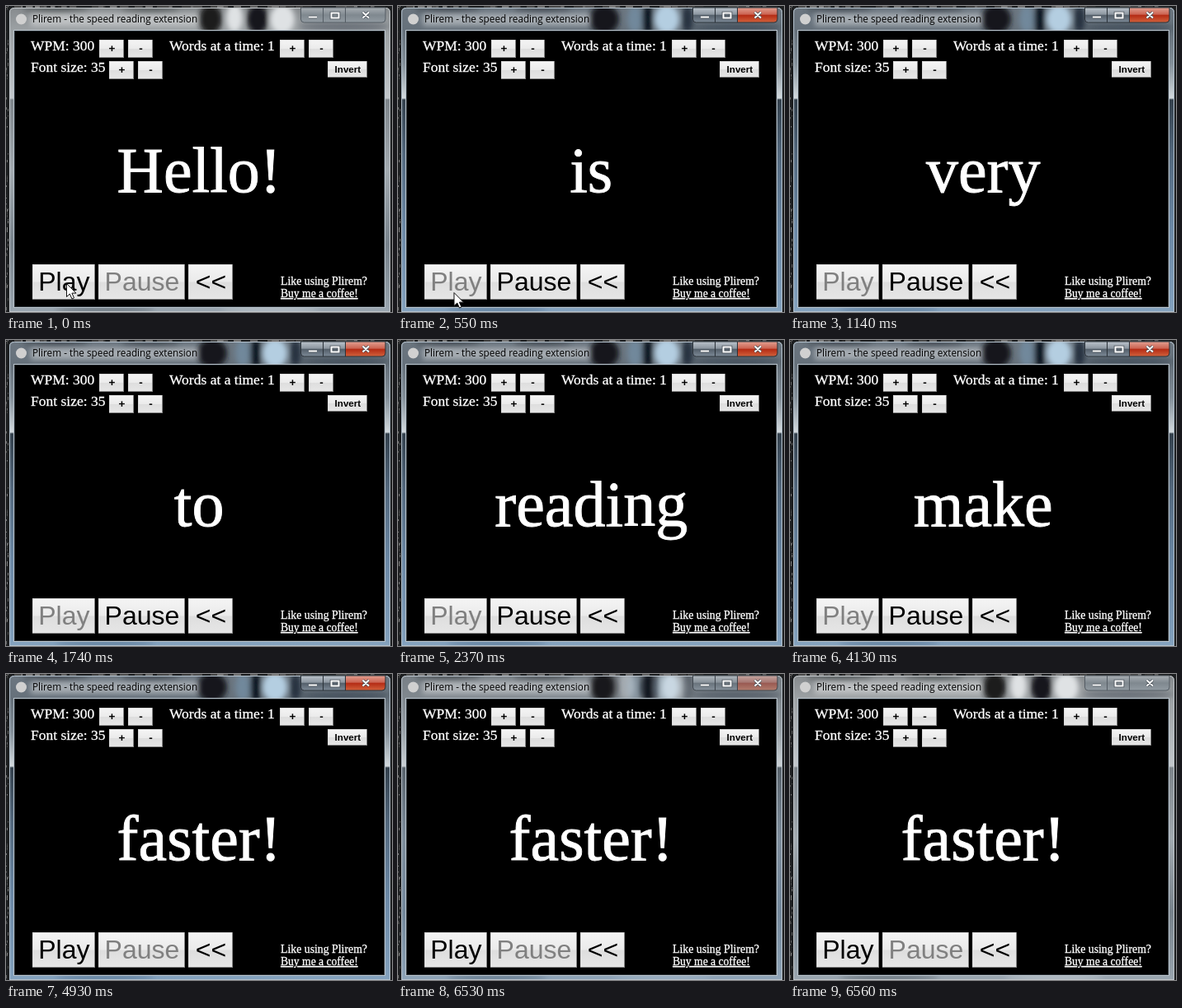
An HTML page that plays this animation: 468x372 px, repeating every 6720 ms.

```html
<!DOCTYPE html>
<html lang="en">
<head>
<meta charset="utf-8">
<title>Speed reader</title>
<style>
html, body { margin: 0; width: 100%; height: 100%; overflow: hidden; background: #000; }
svg { display: block; width: 468px; height: 372px; }
.serif { font-family: "Liberation Serif", serif; fill: #fff; stroke: #fff; stroke-width: .3px; }
#word { stroke-width: .9px; }
.sans { font-family: "Liberation Sans", sans-serif; }
.title { font-family: "Open Sans", sans-serif; font-size: 11.75px; fill: #000; }
</style>
</head>
<body>
<svg id="stage" viewBox="0 0 468 372" xmlns="http://www.w3.org/2000/svg">
  <defs>
    <linearGradient id="face" x2="0" y2="1">
      <stop offset="0" stop-color="#f4f4f4"/><stop offset=".48" stop-color="#ebebeb"/>
      <stop offset=".52" stop-color="#dedede"/><stop offset="1" stop-color="#e6e6e6"/>
    </linearGradient>
    <linearGradient id="red" x2="0" y2="1">
      <stop offset="0" stop-color="#e3a092"/><stop offset=".46" stop-color="#cb6250"/>
      <stop offset=".5" stop-color="#b32a14"/><stop offset="1" stop-color="#d3623c"/>
    </linearGradient>
    <linearGradient id="steel" x2="0" y2="1">
      <stop offset="0" stop-color="#bcc4cc"/><stop offset=".46" stop-color="#8b959f"/>
      <stop offset=".5" stop-color="#535e69"/><stop offset="1" stop-color="#7d8a97"/>
    </linearGradient>
    <linearGradient id="pale" x2="0" y2="1">
      <stop offset="0" stop-color="#a9afb4"/><stop offset=".5" stop-color="#7f888f"/>
      <stop offset="1" stop-color="#929ba2"/>
    </linearGradient>
    <filter id="soft" x="-50%" y="-50%" width="200%" height="200%"><feGaussianBlur stdDeviation="3"/></filter>
    <clipPath id="win"><path d="M4 372V8q0-6 6-6H460q6 0 6 6V372Z"/></clipPath>
  </defs>
  <rect width="468" height="372" fill="#1c1e20"/>
  <g id="idle"></g>
  <g id="active"></g>
  <g id="chrome"></g>
  <g id="page"></g>
  <text id="word" class="serif" x="234.2" y="226" font-size="78" text-anchor="middle"></text>
  <path id="cursor" d="M0 0V16L3.8 12.5L6.5 18.5L9 17.4L6.4 11.6H11.5Z" fill="#fff" stroke="#111" stroke-width="1"/>
</svg>
<script>
const LOOP = 6720, PLAY = 140, END = 4930;
const APP = "Plirem";
const $ = id => document.getElementById(id);

function add(parent, tag, attrs, text) {
  const el = document.createElementNS("http://www.w3.org/2000/svg", tag);
  for (const k in attrs) el.setAttribute(k, attrs[k]);
  if (text) el.textContent = text;
  parent.appendChild(el);
  return el;
}
const rect = (p, x, y, width, height, fill, more) =>
  add(p, "rect", { x, y, width, height, fill, ...more });

// Glass frame: vertical tint of [y, colour] stops, then soft blobs of [x, y, rx, ry, colour]
function glass(group, stops, blobs, edge) {
  const id = group.id + "Tint";
  const tint = add(group, "linearGradient", { id, gradientUnits: "userSpaceOnUse", x1: 0, y1: 0, x2: 0, y2: 372 });
  for (const [y, color] of stops) add(tint, "stop", { offset: y / 372, "stop-color": color });
  const g = add(group, "g", { "clip-path": "url(#win)" });
  rect(g, 0, 0, 468, 372, `url(#${id})`);
  const s = add(g, "g", { filter: "url(#soft)" });
  for (const [cx, cy, rx, ry, fill] of blobs) add(s, "ellipse", { cx, cy, rx, ry, fill });
  add(group, "path", { d: "M4.5 371.5V8q0-5.5 6-5.5H460q5.5 0 5.5 6V371.5Z", fill: "none", stroke: edge });
}

function captions(group, fill, close, edge) {
  const d = "M357.5 2V16q0 4 4 4H456q4 0 4-4V2Z";
  add(group, "path", { d, fill });
  add(group, "path", { d: "M411.5 2V20H456q4 0 4-4V2Z", fill: close });
  add(group, "path", { d: d + "M384.5 2V20M411.5 2V20", fill: "none", stroke: edge });
}

function button(x, y, w, h, label, size, weight) {
  const g = $("page");
  rect(g, x, y, w, h, "#8a8a8a");
  rect(g, x, y, w - 1, h - 1, "#d8d8d8");
  rect(g, x + 1, y + 1, w - 2, h - 2, "url(#face)");
  return add(g, "text", {
    class: "sans", x: x + w / 2 + .4, y: y + h / 2 + size * .325, "font-size": size,
    "font-weight": weight || 400, "text-anchor": "middle", fill: "#000"
  }, label);
}

const serif = (x, y, size, text) =>
  add($("page"), "text", { class: "serif", x, y, "font-size": size }, text);

// Desktop speckle around the window
let seed = 7;
const rnd = () => (seed = seed * 16807 % 2147483647) / 2147483647;
for (let i = 0; i < 60; i++) {
  const v = 40 + rnd() * 90 | 0;
  rect($("idle"), rnd() * 468 | 0, 0, 3 + rnd() * 8, 2, `rgb(${v},${v},${v})`);
  rect($("idle"), rnd() * 3 | 0, rnd() * 372 | 0, 1, 1 + rnd() * 3, `rgb(${v},${v},${v})`);
}

glass($("idle"), [
  [0, "#85898c"], [30, "#9da2a5"], [112, "#c3c8cc"], [114, "#7f868c"],
  [200, "#a3abb1"], [290, "#78838c"], [372, "#9aa6b0"]
], [
  [60, 4, 40, 3, "#4e5254"], [175, 5, 35, 3, "#505456"],
  [248, 16, 14, 18, "#1b1d1f"], [277, 14, 10, 18, "#dfe2e4"],
  [305, 16, 13, 18, "#17191b"], [335, 16, 15, 18, "#dfe2e4"], [410, 25, 55, 5, "#697078"],
  [120, 369, 60, 4, "#6f7a83"], [320, 369, 60, 4, "#b4bec6"]
], "#c3c8cc");
captions($("idle"), "url(#pale)", "url(#pale)", "#545c64");

glass($("active"), [
  [0, "#6c7680"], [30, "#66717b"], [70, "#84909a"], [112, "#d3dade"], [114, "#35424e"],
  [180, "#54697e"], [270, "#6c89a6"], [372, "#84a2be"]
], [
  [60, 4, 40, 3, "#3c454d"], [175, 5, 35, 3, "#3c454d"],
  [250, 16, 18, 18, "#14191e"], [287, 16, 9, 17, "#71889b"],
  [303, 16, 7, 18, "#111820"], [326, 16, 15, 18, "#b4cee1"],
  [351, 16, 7, 17, "#26333f"], [410, 26, 55, 5, "#46525e"],
  [120, 369, 60, 4, "#6583a0"]
], "#b4c2ce");
captions($("active"), "url(#steel)", "url(#red)", "#2b3239");

const chrome = $("chrome");
rect(chrome, 30, 9, 204, 15, "#fff", { opacity: .4, filter: "url(#soft)" });
add(chrome, "circle", { cx: 18.5, cy: 16, r: 6.5, fill: "#d0d0d0" });
add(chrome, "text", { class: "title", x: 32, y: 20 }, APP + " - the speed reading extension");
const glyphs = "M367 13.5H377M394.5 8.5H403.5V14.5H394.5ZM432.5 7.5L440 14.5M440 7.5L432.5 14.5";
add(chrome, "path", { d: glyphs, fill: "none", stroke: "#434b53", "stroke-width": 3.6 });
add(chrome, "path", { d: glyphs, fill: "none", stroke: "#fff", "stroke-width": 2 });
rect(chrome, 9.5, 29.5, 450, 337, "#000", { stroke: "#b9c3cb" });
rect(chrome, 10.5, 30.5, 448, 335, "#000", { stroke: "#22282d" });

serif(30, 54, 17.5, "WPM: 300");
serif(198, 54, 17.5, "Words at a time: 1");
serif(30, 80, 17.5, "Font size: 35");
for (const [x, y] of [[113, 41], [332, 41], [125, 67]]) {
  button(x, y, 30, 22, "+", 13.5, 700);
  button(x + 35, y, 30, 22, "-", 13.5, 700);
}
button(390, 67, 48, 20, "Invert", 11.6, 700);
const play = button(32, 314, 76, 43, "Play", 32);
const pause = button(112, 314, 105, 43, "Pause", 32);
button(221, 314, 54, 43, "<<", 32);
serif(333, 339, 13.8, `Like using ${APP}?`);
serif(333, 354, 13.6, "Buy me a coffee!").setAttribute("text-decoration", "underline");

// Each word stays 200 ms, except where a beat slips
const words = `Hello! This is ${APP}, a very simple way to do speed reading and lets you control ` +
  "the pace and can make you read even faster!";
const cues = [];
let at = PLAY;
for (const text of words.split(" ")) {
  cues.push({ at, text });
  at += text === "do" ? 230 : text === "reading" ? 160 : 200;
}
cues[0].at = 0;
// Align the run so that "very" falls on its beat
const shift = 1140 - cues.find(c => c.text === "very").at;
cues.forEach((c, i) => { if (i) c.at += shift; });

function draw(t) {
  const focus = t < 30 ? 0 : t < 60 ? .5 : t < 6530 ? 1 : t < 6560 ? .5 : 0;
  $("active").setAttribute("opacity", focus);

  let word = cues[0].text;
  for (const c of cues) if (t >= c.at) word = c.text;
  if ($("word").textContent !== word) $("word").textContent = word;

  const running = t >= PLAY && t < END;
  play.setAttribute("fill", running ? "#808080" : "#000");
  pause.setAttribute("fill", running ? "#000" : "#808080");

  const k = Math.min(1, Math.max(0, (t - 340) / 400));
  $("cursor").setAttribute("transform", `translate(${73.5 - 20 * k * k} ${337.5 + 40 * k * k})`);
  $("cursor").setAttribute("visibility", t < 740 ? "visible" : "hidden");
}

let start;
function tick(now) {
  if (start === undefined) start = now;
  draw((now - start) % LOOP);
  requestAnimationFrame(tick);
}
draw(0);
requestAnimationFrame(tick);
</script>
</body>
</html>
```
